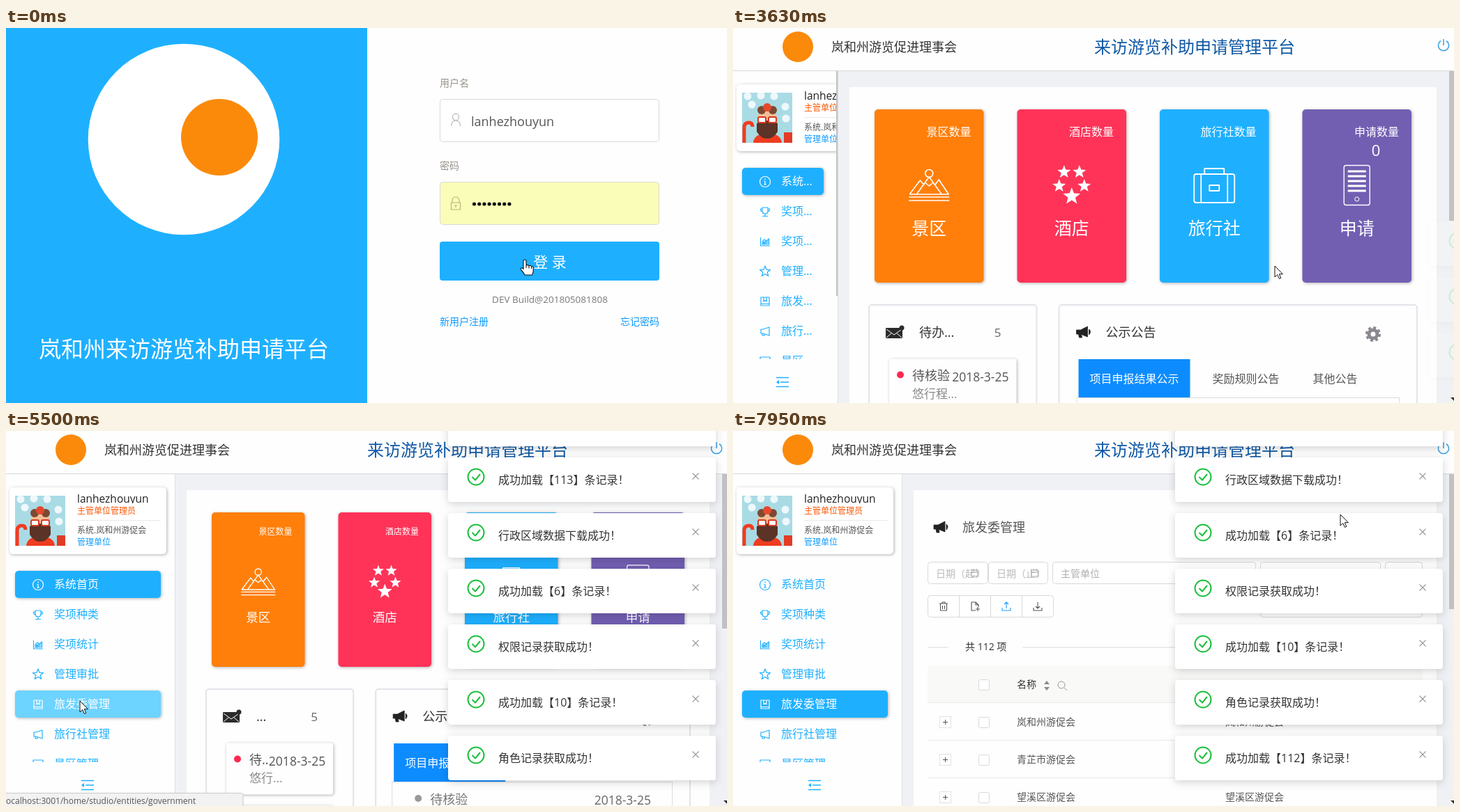
Write an HTML page that moves like this. It is 1034 by 539 pixels and loops after 8000 ms.

```html
<!DOCTYPE html>
<html lang="zh-CN">
<head>
<meta charset="utf-8">
<title>登录与管理演示</title>
<style>
  html, body { margin: 0; width: 100%; height: 100%; overflow: hidden; background: #fefefe; }
  svg { display: block; }
  text { font-family: "Open Sans", "Noto Sans CJK SC", "Noto Sans CJK", "Noto Sans", sans-serif; }
  .soft { filter: drop-shadow(1px 1px 2px rgba(0, 0, 0, .3)); }
  .toast { filter: drop-shadow(0 3px 6px rgba(0, 0, 0, .17)); }
</style>
</head>
<body>
<svg id="stage" width="1034" height="539" viewBox="0 0 1034 539"></svg>
<script>
const LOOP = 8000, BLUE = '#1eb0ff', LINK = '#0f9bff', GREY = '#d9d9d9';
const stage = document.getElementById('stage');

// [first, last, count] of evenly spaced picture changes
const STEPS = [[0, 0, 1], [350, 1110, 8], [1210, 1980, 8], [2100, 2660, 6], [3300, 3300, 1],
  [3520, 3950, 5], [4180, 4940, 8], [5060, 5500, 5], [5610, 5840, 3], [5960, 6610, 7],
  [6730, 6730, 1], [6830, 7610, 8], [7710, 7950, 3]]
  .flatMap(([a, b, n]) => Array.from({ length: n }, (_, k) => a + (b - a) * k / (n - 1 || 1)));

// time, x, y and shape of the pointer
const POINTER = [
  [0, 744, 333, 'hand'], [350, 752, 322, 'hand'], [460, 760, 290, 'arrow'], [570, 740, 245, 'beam'],
  [680, 700, 190, 'arrow'], [790, 680, 130, 'beam'], [900, 640, 85, 'arrow'], [1110, 550, 43, 'arrow'],
  [1210, 540, 55, 'arrow'], [1430, 506, 110, 'arrow'], [1650, 640, 250, 'beam'], [1760, 720, 290, 'arrow'],
  [1980, 710, 190, 'arrow'], [2100, 690, 150, 'beam'], [2200, 710, 195, 'arrow'], [2320, 728, 245, 'beam'],
  [2430, 755, 297, 'arrow'], [2540, 770, 330, 'hand'], [2660, 778, 343, 'hand'], [3520, 777, 342, 'arrow'],
  [3950, 777, 342, 'arrow'], [4180, 640, 345, 'arrow'], [4400, 330, 352, 'arrow'], [4500, 110, 345, 'hand'],
  [4610, 71, 340, 'hand'], [4720, 71, 342, 'hand'], [4940, 90, 380, 'hand'], [5060, 102, 386, 'hand'],
  [5380, 106, 388, 'arrow'], [5610, 106, 388, 'hand'], [5840, 106, 388, 'hand'], [5960, 130, 380, 'hand'],
  [6060, 190, 350, 'arrow'], [6170, 255, 300, 'arrow'], [6280, 302, 256, 'hand'], [6490, 392, 252, 'hand'],
  [6610, 437, 250, 'hand'], [7160, 437, 250, 'hand'], [7270, 470, 290, 'arrow'], [7610, 645, 440, 'arrow'],
  [7710, 760, 300, 'arrow'], [7830, 960, 60, 'arrow'], [7950, 871, 120, 'arrow']];

const SIDEBAR = [[3520, 150], [3630, 150], [3740, 205], [3850, 235], [3950, 242]];
const TIPS = [[6270, 0, '删除'], [6380, 1, '新增'], [6490, 2, '更新'], [6730, 3, '下载'], [7270, -1, '']];
const DATA_AT = 7270, PAGE_AT = 5610;
const TOASTS = [[3620, '登录成功！'], [3620, '成功加载【113】条记录！'], [3620, '行政区域数据下载成功！'],
  [3730, '成功加载【6】条记录！'], [3730, '权限记录获取成功！'], [3840, '成功加载【10】条记录！'],
  [3840, '角色记录获取成功！'], [DATA_AT, '成功加载【112】条记录！']];

const mix = (a, b, p) => a + (b - a) * p;
const before = (table, t) => table.filter(row => row[0] <= t + 1).pop();
function track(table, t, col) {
  const i = table.findIndex(row => row[0] > t);
  if (i < 0) return table[table.length - 1][col];
  if (i === 0) return table[0][col];
  const [a, b] = [table[i - 1], table[i]];
  return mix(a[col], b[col], (t - a[0]) / (b[0] - a[0]));
}

// drawing helpers
const rect = (x, y, w, h, fill, r = 0, more = '') =>
  `<rect x="${x}" y="${y}" width="${w}" height="${h}" rx="${r}" fill="${fill}" ${more}/>`;
const box = (x, y, w, h, line = GREY, fill = '#fff', r = 4) =>
  rect(x + .5, y + .5, w - 1, h - 1, fill, r, `stroke="${line}"`);
const path = (d, line, width = 1, fill = 'none') =>
  `<path d="${d}" stroke="${line}" stroke-width="${width}" fill="${fill}" stroke-linejoin="round"/>`;
const dot = (x, y, r, fill, more = '') => `<circle cx="${x}" cy="${y}" r="${r}" fill="${fill}" ${more}/>`;
const text = (x, cy, size, str, fill = '#333', anchor = 'start', more = '') =>
  `<text x="${x}" y="${cy + size * .37}" font-size="${size}" fill="${fill}" text-anchor="${anchor}" ${more}>${str}</text>`;
const at = (x, y, inner, scale = 1, more = '') =>
  `<g transform="translate(${x} ${y}) scale(${scale})" ${more}>${inner}</g>`;
const clip = (id, x, y, w, h, inner) =>
  `<clipPath id="${id}">${rect(x, y, w, h, '#000')}</clipPath><g clip-path="url(#${id})">${inner}</g>`;
const star = (x, y, r) => 'M' + Array.from({ length: 10 }, (_, i) => {
  const a = i * Math.PI / 5, q = i % 2 ? r * .42 : r;
  return `${(x + q * Math.sin(a)).toFixed(1)},${(y - q * Math.cos(a)).toFixed(1)}`;
}).join('L') + 'Z';

const POINTERS = {
  arrow: path('M0,0V16L3.8,12.6L6.4,18.4L8.8,17.4L6.3,11.7H11.4Z', '#111', 1, '#fff'),
  hand: path('M-2,2Q-2,0 0,0Q2,0 2,2V8q2.3,-1 4,.6q2.3,-.6 3.6,.9q2.6,-.3 2.6,2.5V16q0,3 -2,6H0' +
    'q-2,-4 -5,-7q-1.7,-2.5 0,-3q2,-.5 3,1.6ZM2,8v4M6,9v3.500M9.500,10v3', '#111', 1.1, '#fff'),
  beam: path('M-3,-8H-1L0,-7L1,-8H3M0,-7V7M-3,8H-1L0,7L1,8H3', '#333')
};

const MENU = [
  ['系统首页', 'M-7.500,0a7.500,7.500 0 1 0 15,0a7.500,7.500 0 1 0 -15,0M0,-4.500V-2.500M-1.500,-.5H0V4M-2,4H2'],
  ['奖项种类', 'M-4,-6H4V-1Q4,3 0,3Q-4,3 -4,-1ZM-4,-4H-6.500Q-6.500,0 -3.500,0M4,-4H6.500Q6.500,0 3.500,0M0,3V6M-4,6.500H4'],
  ['奖项统计', 'M-6.500,-6V6H7M-4,4V0L-1,-3L2,-1L5.500,-4V4ZM-3,3L4.500,2M-3,2L4.500,0M-3,1L4.500,-2'],
  ['管理审批', star(0, 0, 8)],
  ['旅发委管理', 'M-6,-6H6V6H-6ZM-2,-6V0L0,-1.500L2,0V-6M-6,3.500H6'],
  ['旅行社管理', 'M-6,-3L-6,3L-3,3L6,6V-6L-3,-3ZM-4,3V6H-1V4'],
  ['景区管理', 'M-7,-6H7V6H-7ZM-4,3L0,-2L4,3']];

const CARDS = [
  ['景区', '#ff7f0a', path('M-28,13L-13,-7L-7,0M-28,13H28L14,-8L8,0M-18,13L0,-12L18,13M-6,-4L0,1L6,-4M-29,17H29M-29,22H29', '#fff', 1.6) +
    dot(0, -17, 5.5, 'none', 'stroke="#fff" stroke-width="1.6"')],
  ['酒店', '#ff3358', path([[-11, -19, 10], [11, -19, 10], [-18, 1, 10], [18, 1, 10], [0, 16, 13]]
    .map(s => star(...s)).join(''), 'none', 0, '#fff')],
  ['旅行社', BLUE, path('M-26,-16H26Q29,-16 29,-13V22Q29,25 26,25H-26Q-29,25 -29,22V-13Q-29,-16 -26,-16Z' +
    'M-14,-16V-24H14V-16M-19,-16V25M19,-16V25M-7,0H7V8H-7Z', '#fff', 1.8)],
  ['申请', '#725fb2', rect(-18.5, -28.5, 37, 57, 'none', 3, 'stroke="#fff" stroke-width="1.4"') +
    path('M-13,-20H13M-13,-13H13M-13,-6H13M-13,1H13M-13,8H13', '#fff', 3) +
    dot(0, 20, 3, 'none', 'stroke="#fff"')]];

const HORN = path('M-11,-3H-5L5,-8V7L-5,3H-11ZM-8,3H-4L-3,8H-7ZM7,-4Q11,-1 7,4Z', '#222', .8, '#222');
const MAIL = rect(-13, -6, 24, 15, '#2b2b2b', 1) + path('M-12,-4L-1,4L10,-4M-12,8L-4,1M10,8L2,1', '#fff') + dot(10, -6, 3.5, '#2b2b2b');
const GEAR = dot(0, 0, 6, 'none', 'stroke="#8c8790" stroke-width="5"') +
  dot(0, 0, 9.6, 'none', 'stroke="#8c8790" stroke-width="3" stroke-dasharray="4 3.54"');
const CALENDAR = path('M-5,-4H5V5H-5ZM-5,-1H5M-2,-6V-3M2,-6V-3', '#aaa');
const TOOLS = ['M-6,-4H6M-2,-4V-6H2V-4M-4.500,-4V6H4.500V-4M-1.500,-1V4M1.500,-1V4',
  'M1,6H-5V-6H1L5,-2V1M1,-6V-2H5M1,4H7M4,1V7', 'M0,3V-6M-3,-3L0,-6L3,-3M-6,2V6H6V2',
  'M0,-6V3M-3,0L0,3L3,0M-6,2V6H6V2'];

function login(t) {
  const pressed = t >= 3300;
  return rect(0, 0, 1034, 539, '#fefefe') + rect(0, 0, 518, 539, BLUE) +
    dot(255, 160, 137.3, '#fff') + dot(306, 157, 55, '#fb8a0a') +
    text(255, 461, 32, '岚和州来访游览补助申请平台', '#fff', 'middle') +
    text(622, 79, 14, '用户名', '#98938a') + box(622, 102, 315, 62) +
    at(645, 132, path('M-4.500,-4a4.500,4.800 0 1 0 9,0a4.500,4.800 0 1 0 -9,0M-6.500,9Q-6,1 0,1Q6,1 6.500,9', '#b5b5b5', 1.2)) +
    text(667, 134, 18, 'lanhezhouyun', '#555') +
    text(622, 198, 14, '密码', '#98938a') + box(622, 221, 315, 62, GREY, '#fafdb8') +
    at(645, 253, path('M-6.500,-2H6.500V8H-6.500ZM-5,-2V-5Q-5,-10 0,-10Q5,-10 5,-5V-2M-2,2H2M0,2V5', '#b9b27c', 1.2)) +
    Array.from({ length: 8 }, (_, i) => dot(671.5 + i * 7.2, 253, 2.6, '#111')).join('') +
    (pressed ? rect(621, 306, 318, 58, '#c6e4f6', 5) : '') +
    rect(622, 307, 315, 56, BLUE, 4) + text(780, 336, 21, '登 录', '#fff', 'middle') +
    text(780, 390, 13.5, 'DEV Build@201805081808', '#777', 'middle') +
    text(622, 422, 14, '新用户注册', LINK) + text(937, 422, 14, '忘记密码', LINK, 'end');
}

const header = () => rect(0, 0, 1034, 61, '#fefefe') + rect(0, 61, 1034, 1, '#d6d8dc') +
  dot(93, 27, 22, '#fb8a0a') + text(141, 27, 18, '岚和州游览促进理事会') +
  text(518, 27, 24, '来访游览补助申请管理平台', '#0f58a5') +
  at(1019, 25, path('M-4,-6.500A7.600,7.600 0 1 0 4,-6.500M0,-9V0', '#3a9fe0', 1.5));

const avatar = () => clip('face', 13, 93, 72, 72, rect(13, 93, 72, 72, '#a9dbe5') +
  [[21, 98], [40, 97], [59, 98], [27, 110], [75, 113], [76, 130]].map(([x, y]) => dot(x, y, 5.5, '#eef8fb')).join('') +
  path('M29,165Q30,152 49,151Q69,152 70,165Z', 'none', 0, '#f03c20') +
  path('M16,165V143Q16,136 23,136Q28,136 28,142', '#f03c20', 5) + rect(73, 150, 12, 15, '#e23b26') +
  rect(35, 118, 28, 34, '#f3bd96', 12) +
  path('M34,137Q49,129 64,137V149Q58,159 49,159Q40,159 34,149Z', 'none', 0, '#5b3327') +
  rect(36, 128, 11, 8, '#fff', 2, 'stroke="#d43a22" stroke-width="2"') +
  rect(51, 128, 11, 8, '#fff', 2, 'stroke="#d43a22" stroke-width="2"') +
  dot(41, 118, 6, '#7c4a33') + dot(57, 118, 6, '#7c4a33') + dot(49, 114, 6, '#e5482c'));

function sidebar(t, w, [x, y]) {
  const active = t >= PAGE_AT ? 4 : 0, full = w > 240;
  const over = x < w - 20 ? Math.floor((y - 201) / 43) : -1;
  const rows = MENU.map(([label, icon], i) => {
    const cy = 220.5 + 43 * i, lit = i === active || i === over, ink = lit ? '#fff' : BLUE;
    return (lit ? rect(13, cy - 19.5, w - 33, 39, i === active ? BLUE : '#6dd3ff', 5, 'class="soft"') : '') +
      at(46, cy + .5, path(icon, ink, 1.2)) + text(69, cy, 16, full ? label : label.slice(0, 2) + '...', ink);
  }).join('');
  const card = `<g class="soft">${rect(5, 81, 225, 96, '#fff', 5)}</g>` + avatar() +
    clip('name', 100, 84, 130, 20, text(102, 97, 15.5, 'lanhezhouyun', '#222')) +
    text(102, 115, 12, '主管单位管理员', '#ff5500') + rect(102, 128, 120, 1, '#e9e9e9') +
    text(102, 143, 12, '系统.岚和州游促会', '#555') + text(102, 160, 12, '管理单位', LINK);
  return rect(0, 62, w, 477, '#fefefe') + rect(w, 62, 1, 477, '#dddfe5') +
    clip('side', 0, 62, w, 414, card + rows) + (full ? '' : rect(w - 2, 62, 2, 323, '#c2c2c2')) +
    at(w / 2 - 4, 509, path('M-9,-6.500H9M-3,0H9M-9,6.500H9', BLUE, 1.6) + path('M-9,0L-5,-3V3Z', 'none', 0, BLUE));
}

function dashboard(t, w) {
  const p = (w - 150) / 92, small = p > .5, left = w + 17;
  const cw = (1009 - left - 72 - 144) / 4, ch = mix(249, 222, p);
  const cards = CARDS.map(([name, color, icon], i) => {
    const x = left + 36 + i * (cw + 48), mid = x + cw / 2;
    return rect(x, 117, cw, ch, color, 5, 'class="soft"') +
      text(x + cw - 18, mix(149, 145, p), mix(16, 12, p), name + '数量', '#fff', 'end') +
      at(mid, mix(226, 217, p), icon, mix(1, .845, p)) +
      text(mid, mix(288, 268, p), mix(25, 17.5, p), name, '#fff', 'middle');
  }).join('') + (small || t < 3600 ? '' : text(922, 176, 22, '0', '#fff', 'middle'));

  const x1 = w + 45, y = mix(398, 371, p), w1 = (981 - x1 - 32) * .319, x2 = x1 + w1 + 32;
  const panel = (x, width) => rect(x, y, width, 200, '#fefefe', 4, 'stroke="#e3e4e9" stroke-width="2"');
  const top = y + 77.5, iw = w1 - 58;
  const todo = panel(x1, w1) + at(x1 + 37, y + 39, MAIL) + text(x1 + 72, y + 39, 18, small ? '...' : '待办...') +
    text(x1 + w1 - 56, y + 40, 17, '5', '#666', 'middle') +
    [0, 90].map(d => rect(x1 + 29, top + d, iw, 74, '#fefefe', 4, 'class="soft"')).join('') +
    dot(x1 + 45, top + 23, 5, '#ff2850') + text(x1 + 62, top + 24, 18, small ? '待..' : '待核验', '#555') +
    text(x1 + 29 + iw - 11, top + 26, 17.5, '2018-3-25', '#555', 'end') +
    text(x1 + 62, top + 50, 17, small ? '悠行...' : '悠行程...', '#8b8b8b');
  const tab = x2 + mix(28, 26, p);
  const news = panel(x2, 981 - x2) + at(x2 + 36, y + 39, HORN) + text(x2 + 67, y + 39, 18, '公示公告') +
    at(918, y + 42, GEAR) + box(tab - 3, y + 133, 956 - tab + 3, 90, '#ddd', '#fefefe', 0) +
    rect(tab, y + 78, 160, 55, '#0d8cff') + text(tab + 80, y + 106, 16, '项目申报结果公示', '#fff', 'middle') +
    text(tab + 192, y + 106, 16, '奖励规则公告', '#555') + text(tab + 336, y + 106, 16, '其他公告', '#555') +
    dot(tab + 35, y + 157, 5, '#999') + text(tab + 52, y + 158, 18, '待核验', '#777') +
    text(925, y + 160, 17.5, '2018-3-25', '#666', 'end');
  return rect(left, 85, 1009 - left, 454, '#fefefe') + cards + todo + news;
}

function listing(t) {
  const loaded = t >= DATA_AT - 1, total = loaded ? '共 112 项' : '共 0 项';
  const [, hot, tip] = before(TIPS, t) || [0, -1, ''];
  const filters = [[279, 87], [366, 86], [458, 292], [756, 173], [935, 54]].map(([x, w]) => box(x, 188, w, 32)).join('') +
    text(291, 205, 14, '日期（起）', '#bbb') + at(347, 204, CALENDAR) +
    text(378, 205, 14, '日期（止）', '#bbb') + at(433, 204, CALENDAR) +
    text(470, 205, 14, '主管单位', '#b0b0b0') + box(756, 236, 233, 32);
  const tools = box(279, 236, 181, 32) + [324, 369, 414].map(x => rect(x, 236, 1, 32, GREY)).join('') +
    (hot < 0 ? '' : box(279 + 45 * hot, 236, 46, 32, '#1e9bff', '#fff', hot % 3 ? 0 : 4)) +
    TOOLS.map((d, i) => at(302 + 45 * i, 252, path(d, i === hot || (i === 2 && loaded) ? '#1e9bff' : '#555', 1.1))).join('');
  const tick = y => box(352, y - 8, 16, 16, GREY, loaded ? '#fff' : '#f5f5f5', 2);
  const rows = ['岚和州游促会', '青芷市游促会', '望溪区游促会'].map((name, i) => {
    const y = 418 + 54 * i;
    return box(296, y - 8, 17, 17, '#e2e2e2', '#fff', 0) + path(`M301,${y + .5}H308M304.500,${y - 3}V${y + 4}`, '#555') +
      tick(y + 1) + text(407, y, 14, name, '#555') + text(706, y, 14, name, '#555') + rect(279, y + 26, 710, 1, '#e9e9e9');
  }).join('');
  const empty = text(634, 418, 14, 'No data', '#999', 'middle') + rect(279, 444, 710, 55, '#f7f7f7') +
    rect(279, 444, 710, 1, '#e9e9e9') + text(295, 473, 14, total, '#555');
  const bubble = hot < 0 ? '' : at(302 + 45 * hot, 0, rect(-22, 280, 44, 33, '#404040', 4) +
    path('M-5,281L0,275L5,281Z', 'none', 0, '#404040') + text(0, 297, 14, tip, '#fff', 'middle', 'font-weight="500"'));
  const ruleX = loaded ? 415 : 400;
  return rect(259, 85, 750, loaded ? 454 : 434, '#fefefe') + at(299, 138, HORN) + text(329, 138, 18, '旅发委管理', '#555') +
    filters + tools + rect(279, 310, 30, 2, '#ececec') + rect(ruleX, 310, 989 - ruleX, 2, '#ececec') +
    text(333, 310, 14, total) + rect(279, 337, 710, 54, '#f9f9f8') + rect(279, 390, 710, 1, '#e9e9e9') +
    tick(365) + text(407, 364, 14, '名称') + path('M446,364L450,359L454,364ZM446,368L450,373L454,368Z', 'none', 0, '#8a8a8a') +
    dot(471, 365, 5, 'none', 'stroke="#999"') + path('M474.500,368.500L479,373', '#999') + (loaded ? rows : empty) + bubble;
}

function toasts(t) {
  const born = TOASTS.filter(([start]) => start <= t + 1);
  return born.map(([start, label], i) => {
    const y = 438 - 80 * (born.length - 1 - i), entering = t - start < 60;
    return at(entering ? 999 : 634, y, rect(0, 0, 384, 64, '#fff', 4) +
      dot(40, 28, 11.5, 'none', 'stroke="#1cc03c" stroke-width="2"') + path('M34.500,28L39,32.500L46,24', '#1cc03c', 2) +
      text(72, 32, 16, label) + path('M350.500,22.500L359.500,31.500M359.500,22.500L350.500,31.500', '#999', 1.1),
      1, `class="toast" opacity="${entering ? .15 : 1}"`);
  }).join('');
}

function admin(t, pos) {
  const w = track(SIDEBAR, t, 1), listed = t >= PAGE_AT - 1;
  const thumb = t >= DATA_AT - 1 ? 194 : listed ? 424 : mix(215, 222, (w - 150) / 92);
  const status = t > 4900 && t < 5950 ? rect(-4, 520.5, 344, 24, '#f2f2f2', 3, 'stroke="#c9c9c9"') +
    text(0, 532, 12, 'ocalhost:3001/home/studio/entities/government', '#555') : '';
  return rect(0, 0, 1034, 539, '#eff1f4') + (listed ? listing(t) : dashboard(t, w)) + sidebar(t, w, pos) + header() +
    rect(1027, 62, 7, 477, '#f0f1f3') + rect(1027, 62, 7, thumb, '#c1c1c3') +
    path('M1029,531H1034V536Z', 'none', 0, '#333') + toasts(t) + status;
}

function scene(t) {
  const pos = [track(POINTER, t, 1), track(POINTER, t, 2)];
  return (t < 3520 ? login(t) : admin(t, pos)) + at(...pos, POINTERS[before(POINTER, t)[3]]);
}

const start = performance.now();
let shown = -1;
function frame() {
  const now = (performance.now() - start) % LOOP;
  const t = STEPS.filter(s => s <= now).pop();
  if (t !== shown) stage.innerHTML = scene(shown = t);
  requestAnimationFrame(frame);
}
frame();
</script>
</body>
</html>
```
